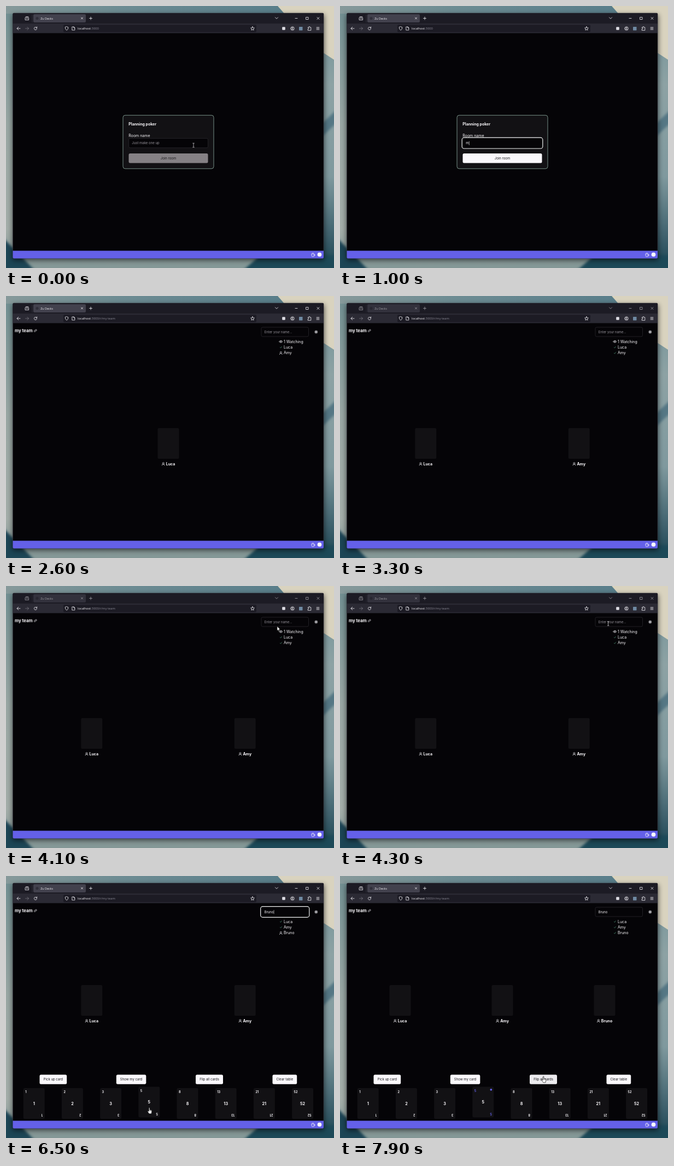
These frames come from a looping animation (600x478 px, 8 s). An HTML page:

```html
<!DOCTYPE html>
<html lang="en">
<head>
<meta charset="utf-8">
<title>Planning poker</title>
<style>
html, body { margin: 0; width: 100%; height: 100%; overflow: hidden; background: #050407; }
svg { display: block; width: 600px; height: 478px; }
text { font-family: Inter, sans-serif; white-space: pre; }
.ui { font-family: "Open Sans", sans-serif; }
.icon { fill: none; stroke: #f4f3f8; stroke-width: .8; stroke-linecap: round; stroke-linejoin: round; }
</style>
</head>
<body>
<svg viewBox="0 0 600 478">
  <defs>
    <linearGradient id="wall" x2="0" y2="1">
      <stop offset="0" stop-color="#6f8d90"/><stop offset=".45" stop-color="#98a6a3"/>
      <stop offset=".85" stop-color="#a3ada8"/><stop offset="1" stop-color="#839796"/>
    </linearGradient>
    <linearGradient id="top">
      <stop offset="0" stop-color="#86999a"/><stop offset=".35" stop-color="#6d8c93"/>
      <stop offset="1" stop-color="#527987"/>
    </linearGradient>
    <linearGradient id="side" x2="0" y2="1">
      <stop offset="0" stop-color="#6c8f96"/><stop offset=".3" stop-color="#8da2a4"/>
      <stop offset=".65" stop-color="#7f999e"/><stop offset="1" stop-color="#1c4353"/>
    </linearGradient>
    <filter id="soft"><feGaussianBlur stdDeviation="2"/></filter>
    <filter id="shade" x="-10%" y="-10%" width="120%" height="120%"><feGaussianBlur stdDeviation="5"/></filter>
  </defs>
  <rect width="600" height="478" fill="url(#wall)"/>
  <rect width="600" height="14" fill="url(#top)"/>
  <rect x="570" width="30" height="478" fill="url(#side)"/>
  <path d="M497 0H600V98L560 72Z" fill="#d9d3bf"/>
  <g filter="url(#soft)">
    <path d="M570 222L606 188V212L570 246Z" fill="#547784"/>
    <path d="M-6 422L60 490H-6Z" fill="#1d4555"/>
    <path d="M425 490L465 455H610V490Z" fill="#1f4858"/>
  </g>
  <rect x="12" y="16" width="570" height="448" fill="#000" opacity=".6" filter="url(#shade)"/>
  <g id="view"></g>
</svg>
<script>
const view = document.getElementById('view');
const ctx = document.createElement('canvas').getContext('2d');
const LOOP = 8000, STEP = 100;
const CARD = '#121114', PAGE = '#050407', INDIGO = '#6460e8', WHITE = '#faf8fb';

const box = (x, y, w, h, fill, r = 0, extra = '') =>
  `<rect x="${x}" y="${y}" width="${w}" height="${h}" rx="${r}" fill="${fill}" ${extra}/>`;
const text = (x, y, s, size, fill = WHITE, extra = '') =>
  `<text x="${x}" y="${y}" font-size="${size}" fill="${fill}" ${extra}>${s}</text>`;
const icon = (x, y, d, extra = '') =>
  `<path class="icon" transform="translate(${x} ${y})" d="${d}" ${extra}/>`;
const dot = (x, y, r, fill) => `<circle cx="${x}" cy="${y}" r="${r}" fill="${fill}"/>`;
const bold = 'font-weight="700"', middle = 'text-anchor="middle"';

function measure(s, size, weight = 400) {
  ctx.font = `${weight} ${size * 10}px Inter, sans-serif`;
  return ctx.measureText(s).width / 10;
}

// Latest value in a list of [time, value] pairs
const latest = (list, t) => list.reduce((v, [at, next]) => t >= at ? next : v, '');

const typeRun = (start, word, from, to) =>
  Array.from({ length: to - from + 1 }, (_, i) => [start + i * STEP, word.slice(0, from + i)]);
const roomKeys = [...typeRun(1000, 'my team', 1, 4), ...typeRun(1700, 'my team', 5, 7)];
const nameKeys = [[4800, 'B'], [5000, 'Br'], [5600, 'Bruno']];

const PERSON = 'M-2.2 2.6V2Q-2.2 .6 0 .6T2.2 2V2.6M0 .4A1.5 1.5 0 1 1 .01 .4';
const CHECK = 'M-1.4 .2L-.4 1.3L1.5 -1.3';
const EYE = 'M-3.2 0Q0 -4 3.2 0Q0 4 -3.2 0M-.9 0A.9 .9 0 1 1 .9 0A.9 .9 0 1 1 -.9 0';

function chrome(url, active) {
  const tone = active ? 1 : .6;
  return box(12.5, 13, 568.5, 447.5, PAGE, 2, 'stroke="#3b3a45" stroke-width=".6"') +
    box(12.5, 13, 568.5, 20, '#1c1b24', 2) +
    box(12.5, 32, 568.5, 17.5, '#2b2a34') +
    `<g opacity="${tone}">` +
    icon(38.5, 22.5, 'M-3 -1.2H3V3H-3ZM-2.3 -3H2.3M-1 1L0 0L1 1') +
    box(47.8, 16, .5, 14, '#4b4a55') +
    box(50, 15, 96, 15, '#42414d', 2) +
    dot(57, 22.5, 2.6, '#302f3a') +
    text(63.3, 24.6, 'Zu Decks', 5.4, '#f4f3f8', 'class="ui"') +
    icon(139, 22.4, 'M-1.5 -1.5L1.5 1.5M1.5 -1.5L-1.5 1.5', 'stroke-width=".6"') +
    icon(155, 22.5, 'M-2.5 0H2.5M0 -2.5V2.5') +
    icon(495, 22, 'M-2.5 -1.2L0 1.3L2.5 -1.2') +
    icon(531, 22.5, 'M-2 0H2') +
    icon(551, 22.5, 'M-2 -2H2V2H-2Z') +
    icon(571, 22.5, 'M-2 -2L2 2M2 -2L-2 2') + '</g>' +
    icon(23, 41, 'M3 0H-3M-.3 -2.7L-3 0L-.3 2.7') +
    icon(38.5, 41, 'M-3 0H3M.3 -2.7L3 0L.3 2.7', 'opacity=".35"') +
    icon(54, 41, 'M2.3 -1.3A2.6 2.6 0 1 0 2.6 .5M2.6 -3V-1H.7') +
    box(105, 34.2, 353, 13.6, '#1c1b24', 2) +
    icon(111, 41, 'M0 -3.3L2.8 -2.2Q3 2 0 3.3Q-3 2 -2.8 -2.2Z') +
    icon(123.5, 41, 'M-2.3 -3H.6L2.3 -1.2V3H-2.3ZM.5 -3V-1H2.3') +
    `<text class="ui" x="131" y="43.1" font-size="5.75" fill="#f4f3f8">localhost<tspan fill="#8d8c98">${url}</tspan></text>` +
    icon(451, 41, 'M0 -3.4L1 -1.1L3.4 -.9L1.6 .8L2.1 3.1L0 1.9L-2.1 3.1L-1.6 .8L-3.4 -.9L-1 -1.1Z', 'stroke-width=".7"') +
    box(505.2, 38.2, 5.6, 5.6, '#dddce3', 1) +
    icon(524, 41, 'M-3.2 0A3.2 3.2 0 1 1 3.2 0A3.2 3.2 0 1 1 -3.2 0M-2 2.3Q0 -.2 2 2.3M-1 -.9A1 1 0 1 1 1 -.9A1 1 0 1 1 -1 -.9') +
    box(536, 38, 6.5, 6.5, '#6f8aa3', .4) +
    icon(555, 41, 'M-2.8 3V.9Q-.8 .9 -.8 -.2T-2.8 -1.3V-2H-1Q-1.2 -3.5 0 -3.5T1 -2H2.8V3Z') +
    icon(570.5, 41, 'M-2.4 -2H2.4M-2.4 0H2.4M-2.4 2H2.4') +
    `<path d="M12.5 446.5H581V458.5Q581 460.5 579 460.5H14.5Q12.5 460.5 12.5 458.5Z" fill="${INDIGO}"/>` +
    icon(562, 454, 'M-2.8 -1.8H1.5V2Q1.5 3 .5 3H-1.8Q-2.8 3 -2.8 2ZM1.5 -.8H2.2Q3.4 -.8 3.4 .4T2.2 1.6H1.5M-1.6 -3.6V-2.9M.3 -3.6V-2.9') +
    dot(573.5, 453.5, 3.8, '#fff');
}

function field(x, y, w, h, value, hint, size, focus, caret) {
  const base = y + h / 2 + 2.2;
  let s = box(x, y, w, h, PAGE, 2.5, 'stroke="#29272c" stroke-width=".8"');
  if (focus) s += box(x - 1.3, y - 1.3, w + 2.6, h + 2.6, PAGE, 3.8, 'stroke="#f1f3f3" stroke-width="1.2"');
  s += value ? text(x + 5.8, base, value, size) : text(x + 5.8, base, hint, size, '#96939a');
  if (focus && caret) s += box(x + 6.1 + measure(value, size), base - 5.5, .6, 7, '#fff');
  return s;
}

function lobby(t) {
  const value = latest(roomKeys, t);
  return box(214, 199.3, 166, 97.5, '#121114', 4, 'stroke="#93b3a6" stroke-width=".8"') +
    text(224.3, 217.8, 'Planning poker', 6.95, WHITE, bold) +
    text(224.3, 238.6, 'Room name', 7) +
    field(224.5, 241.5, 145, 17.2, value, 'Just make one up', 6, t >= 100, true) +
    box(224.5, 269, 145, 17.5, value ? WHITE : '#858185', 2.5) +
    text(297, 280, 'Join room', 6, '#19181b', middle);
}

function player(name, x, y) {
  const w = measure(name, 7, 700), left = x - (w + 8) / 2;
  return box(x - 19.5, y, 39, 56, CARD, 2.5) +
    icon(left + 3, y + 65.3, PERSON, 'stroke-width=".7"') +
    text(left + 8, y + 67.6, name, 7, WHITE, bold);
}

function handCard(value, i, lifted, picked) {
  const ink = picked ? INDIGO : WHITE;
  const corner = text(3.5, 9, value, 5.5, ink, bold);
  return `<g transform="translate(${31.7 + i * 70.2} ${lifted ? 384.5 : 387})">` +
    box(0, 0, 39, 56, CARD, 2.5) + corner +
    `<g transform="rotate(180 19.5 28)">${corner}</g>` +
    text(19.5, 30.5, value, 7.2, WHITE, bold + ' ' + middle) +
    (picked ? dot(34, 5.3, 1.9, INDIGO) : '') + '</g>';
}

function listRow(i, d, label, ink = '#f4f3f8') {
  const y = 83 + i * 10.4;
  return icon(502.8, y + .2, d, `style="stroke:${ink};stroke-width:.7"`) + text(508, y + 2.5, label, 7);
}

function room(t) {
  const name = latest(nameKeys, t), amyIn = t >= 3300, picked = t >= 6800;
  const focus = t >= 4400 && t < 6800, caret = t < 6000 || t >= 6300;
  const seated = ['Luca', ...(amyIn ? ['Amy'] : []), ...(picked ? ['Bruno'] : [])];
  const rows = [['Luca', true], ['Amy', amyIn]];
  if (name) rows.push([name, picked]);

  let s = text(16, 65.7, 'my team', 7.8, WHITE, bold) +
    icon(53.7, 63.2, 'M-.5 -1L.5 -2A1.3 1.3 0 0 1 2.3 -.2L1.2 .8M.5 1L-.5 2A1.3 1.3 0 0 1 -2.3 .2L-1.2 -.8M-.8 .8L.8 -.8', 'stroke-width=".6" opacity=".8"') +
    field(467, 57, 86.5, 17, name, 'Enter your name...', 5.9, focus, caret) +
    icon(567.3, 65.6, 'M-2.5 -1H2.5M-2.5 1H2.5M-1 -2.5V2.5M1 -2.5V2.5');
  if (!name) s += listRow(0, EYE, '1 Watching');
  rows.forEach(([who, ready], i) => {
    s += listRow(i + (name ? 0 : 1), ready ? CHECK : PERSON, who, ready ? '#4f9a7c' : undefined);
  });
  seated.forEach((who, i) => {
    s += player(who, 16.5 + 561 * (i + .5) / seated.length, name ? 199 : 241);
  });
  if (!name) return s;

  [['Pick up card', 61.5, 49.7], ['Show my card', 201.8, 54.5], ['Flip all cards', 347, 50], ['Clear table', 487.5, 44.7]]
    .forEach(([label, x, w], i) => {
      s += box(x, 362.5, w, 17.3, i === 2 && t >= 7800 ? '#ecebee' : WHITE, 2.5) +
        text(x + w / 2, 373.4, label, 6, '#19181b', middle);
    });
  [1, 2, 3, 5, 8, 13, 21, 52].forEach((v, i) => {
    s += handCard(v, i, i === 3 && t >= 6500, i === 3 && picked);
  });
  return s;
}

// Pointer trips: [visible from, until, [[time, x, y], ...]]
const trips = [
  [0, 1000, [[0, 343, 254]]],
  [2500, 2600, [[2500, 430.5, 253]]],
  [3500, 4800, [[3500, 600, 300], [4100, 496, 73.5], [4400, 488, 66]]],
  [6300, 8000, [[6300, 470, 92], [6400, 345, 300], [6500, 263, 428], [7000, 263, 428], [7600, 329, 322], [7900, 373, 371]]]
];

function pointer(t) {
  const trip = trips.find(([from, to]) => t >= from && t < to);
  if (!trip) return '';
  const path = trip[2], i = path.findIndex(p => p[0] > t);
  const b = i < 0 ? path[path.length - 1] : path[i], a = i > 0 ? path[i - 1] : b;
  const k = b === a ? 0 : (t - a[0]) / (b[0] - a[0]);
  const x = a[1] + (b[1] - a[1]) * k, y = a[2] + (b[2] - a[2]) * k;
  const place = `transform="translate(${x} ${y})"`;
  if (t < 3000 || (t >= 4200 && t < 4800))
    return `<path ${place} d="M-1.7 -3.7H1.7M0 -3.7V3.7M-1.7 3.7H1.7" stroke="#c9c8cc" stroke-width=".8" fill="none"/>`;
  const hand = (t >= 6500 && t <= 7000) || t >= 7800;
  const d = hand
    ? 'M-1.7 -5Q-.8 -6.2 0 -5V-1.6L2.8 -.9Q4 -.5 3.8 1L3 5.8H-1.2L-3.8 2Q-4.3 .4 -3 .5L-1.7 1.5Z'
    : 'M0 0V8.2L1.9 6.5L3.2 9.4L4.6 8.8L3.3 6H5.8Z';
  return `<path ${place} d="${d}" fill="#fff" stroke="#111" stroke-width=".7" stroke-linejoin="round"/>` +
    (hand ? `<path ${place} d="M.1 -1.4V1M1.4 -1.1V1M2.7 -.8V1" stroke="#111" stroke-width=".45"/>` : '');
}

let shown = -1;
function draw(now) {
  const t = Math.floor(now % LOOP / STEP) * STEP;
  if (t !== shown) {
    shown = t;
    const inRoom = t >= 2000, active = t < 3300 || t >= 4400;
    view.innerHTML = chrome(inRoom ? ':3000/r/my team' : ':3000', active) +
      (inRoom ? room(t) : lobby(t)) + pointer(t);
  }
  requestAnimationFrame(() => draw(performance.now() - start));
}
const start = performance.now();
draw(0);
</script>
</body>
</html>
```
